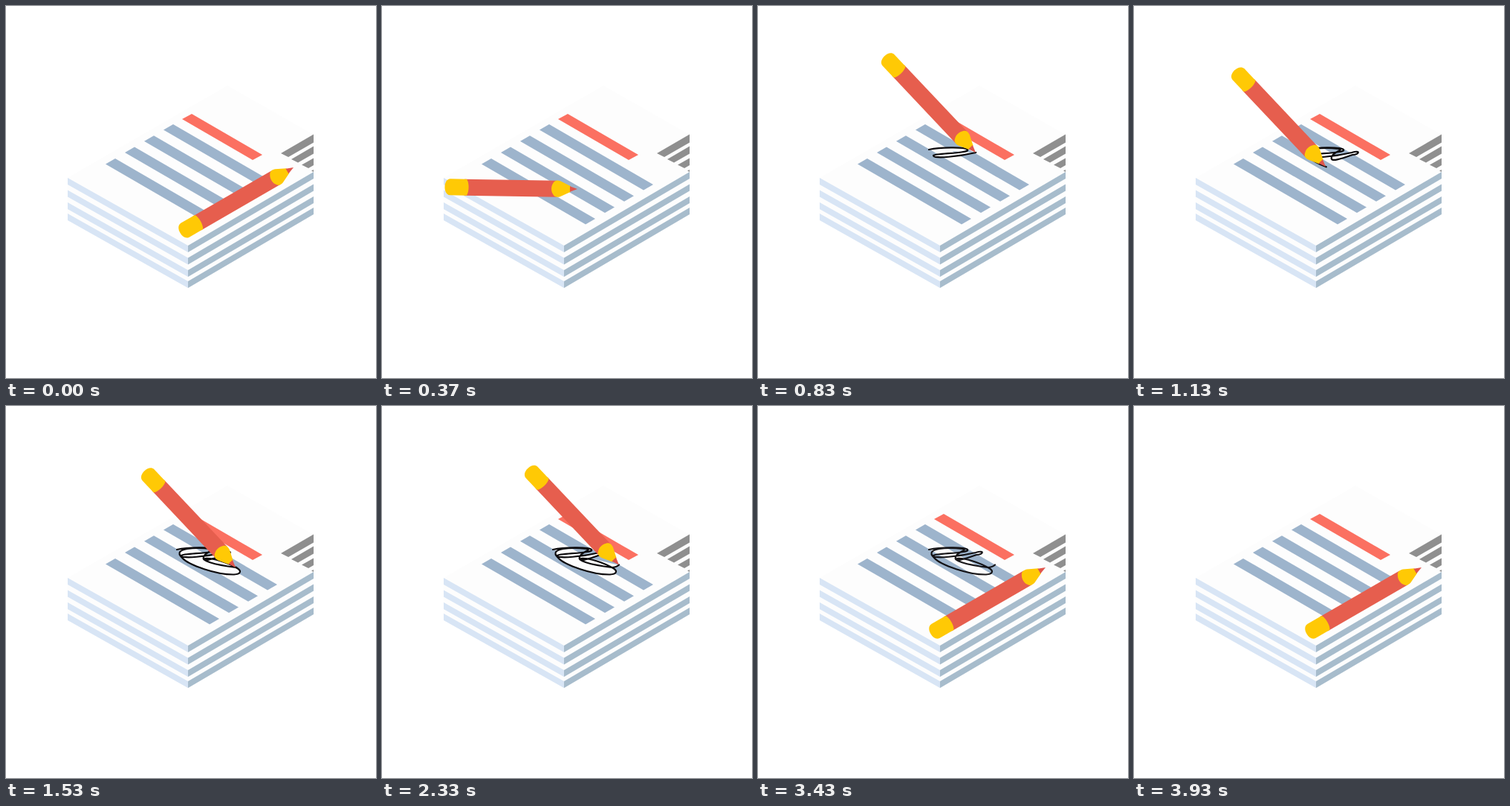
Recreate the animation shown at these times as an HTML page. Size 498 px wide and 500 px high, loop 4830 ms.

```html
<!DOCTYPE html>
<html lang="en">
<head>
<meta charset="utf-8">
<title>Signing a stack of paper</title>
<style>
html, body { margin: 0; width: 100%; height: 100%; overflow: hidden; background: #fff; }
svg { display: block; width: 100%; height: 100%; }
</style>
</head>
<body>
<svg viewBox="0 0 498 500">
  <path fill="#fdfdfd" d="M83 231 298 107 414 173V280L245 378 83 287Z"/>
  <g id="layers"></g>
  <g id="lines"></g>
  <g fill="#8f8f8f">
    <path d="M370 198 380 203 414 183.500V172.500Z"/>
    <path d="M384 206 393 210.500 414 198.500V188.500Z"/>
    <path d="M398 213.500 407 218 414 214V204.500Z"/>
    <path d="M411 221.500 414 223V220Z"/>
  </g>
  <path id="fill" fill="#fdfdfd"/>
  <path id="ink" fill="none" stroke="#0c0a0c" stroke-width="2.2" stroke-linecap="round" stroke-linejoin="round"/>
  <g id="pencil">
    <path fill="#e65e4e" d="M-28-11H-152V11H-28Z"/>
    <path fill="#ffc905" d="M-149-11H-171C-176-10.500-178.500-6-178.500 0S-176 10.500-171 11H-149C-145.500 6-145.500-6-149-11Z"/>
    <path fill="#ffc905" d="M-9-3.800-23-10.500C-28-12-31-11-33-7-35.500-3-35.500 3-33 7-31 11-28 12-23 10.500L-9 3.800Z"/>
    <path fill="#e0554c" d="M0 0-10-3.800V3.800Z"/>
  </g>
</svg>
<script>
const LOOP = 4830;
const LIFT = 2400;   // the pencil leaves the paper
const TILT = 46.6;   // writing angle
const $ = id => document.getElementById(id);
const NS = 'http://www.w3.org/2000/svg';

function shape(parent, fill, d) {
  const p = document.createElementNS(NS, 'path');
  p.setAttribute('fill', fill);
  p.setAttribute('d', d);
  parent.append(p);
}

// Edges of the paper stack
for (const y of [0, 16.5, 33, 48]) {
  shape($('layers'), '#d8e5f5', `M83 ${231 + y}L245 ${322 + y}v9L83 ${240 + y}Z`);
  shape($('layers'), '#a7bccc', `M245 ${322 + y}L414 ${223 + y}v9L245 ${331 + y}Z`);
}

// Heading and text bars
shape($('lines'), '#fb7061', 'M237 152 250 145 345 200 332 207Z');
for (let i = 0; i < 4; i++) {
  shape($('lines'), '#9db4cc', `M${212 - 26 * i} ${166.500 + 15.300 * i}l13-7.500 140 81-13 7.500Z`);
}

// Signature strokes, each with the time its end is reached
const strokes = [
  [640, 'M230 193C244 190 278 189 282 193'],
  [735, 'C286 198 238 198 236 201'],
  [830, 'C236 206 272 202 293 197'],
  [880, 'C306 193 303 200 294 200'],
  [980, 'C280 205 263 211 266 203C268 196 284 193 275 192'],
  [1070, 'C258 190 222 190 237 204'],
  [1290, 'C246 214 284 227 307 226.500C316 226 317 222 312 218.500'],
  [1430, 'C298 210 278 204 268 205'],
  [1530, 'C262 207 278 213 309 217'],
  [2100, 'C313 217 316 216 319 213.500']
];
const ink = $('ink');
const keys = [[540, 0]];
let trail = '';
for (const [time, d] of strokes) {
  trail += d;
  ink.setAttribute('d', trail);
  keys.push([time, ink.getTotalLength()]);
}
const total = keys[keys.length - 1][1];

function drawnAt(t) {
  for (let i = 1; i < keys.length; i++) {
    const [t0, a] = keys[i - 1], [t1, b] = keys[i];
    if (t < t1) return a + (b - a) * Math.max(0, (t - t0) / (t1 - t0));
  }
  return total;
}

// Outline of the part written so far, closed for the paper-coloured fill
function outline(length) {
  let d = '';
  for (let s = 0; s <= length; s += 2) {
    const p = ink.getPointAtLength(s);
    d += `${d ? 'L' : 'M'}${p.x} ${p.y}`;
  }
  return d;
}

const clamp = v => Math.min(1, Math.max(0, v));
const smooth = v => v * v * (3 - 2 * v);
const bend = (a, b, c, u) => (1 - u) * (1 - u) * a + 2 * u * (1 - u) * b + u * u * c;

function pose(t) {
  if (t < 540) {
    const k = t / 540, u = smooth(k);
    return [bend(387, 297.600, 230, u), bend(217, 337, 193, u),
      -30 + (TILT + 30) * Math.pow(k, 2.4), 0.987 + 0.013 * clamp(t / 370)];
  }
  if (t < LIFT) {
    const p = ink.getPointAtLength(drawnAt(t));
    return [p.x, p.y, TILT, 1];
  }
  const u = smooth(clamp((t - LIFT) / 570));
  return [bend(319, 322.600, 387, u), bend(213.500, 260.500, 217, u),
    TILT - (TILT + 30) * (u + 0.25 * u * (1 - u)), 1];
}

function render(t) {
  const drawn = drawnAt(t);
  ink.setAttribute('visibility', drawn > 0 ? 'visible' : 'hidden');
  ink.setAttribute('stroke-dasharray', `${drawn} ${total + 10}`);
  ink.setAttribute('opacity', 1 - clamp((t - 3400) / 530));
  $('fill').setAttribute('d', t < LIFT ? outline(drawn) : '');
  const [x, y, angle, stretch] = pose(t);
  $('pencil').setAttribute('transform', `translate(${x} ${y}) rotate(${angle}) scale(${stretch} 1)`);
}

let start;
function tick(now) {
  start ??= now;
  render(Math.max(0, now - start) % LOOP);
  requestAnimationFrame(tick);
}
render(0);
requestAnimationFrame(tick);
</script>
</body>
</html>
```
